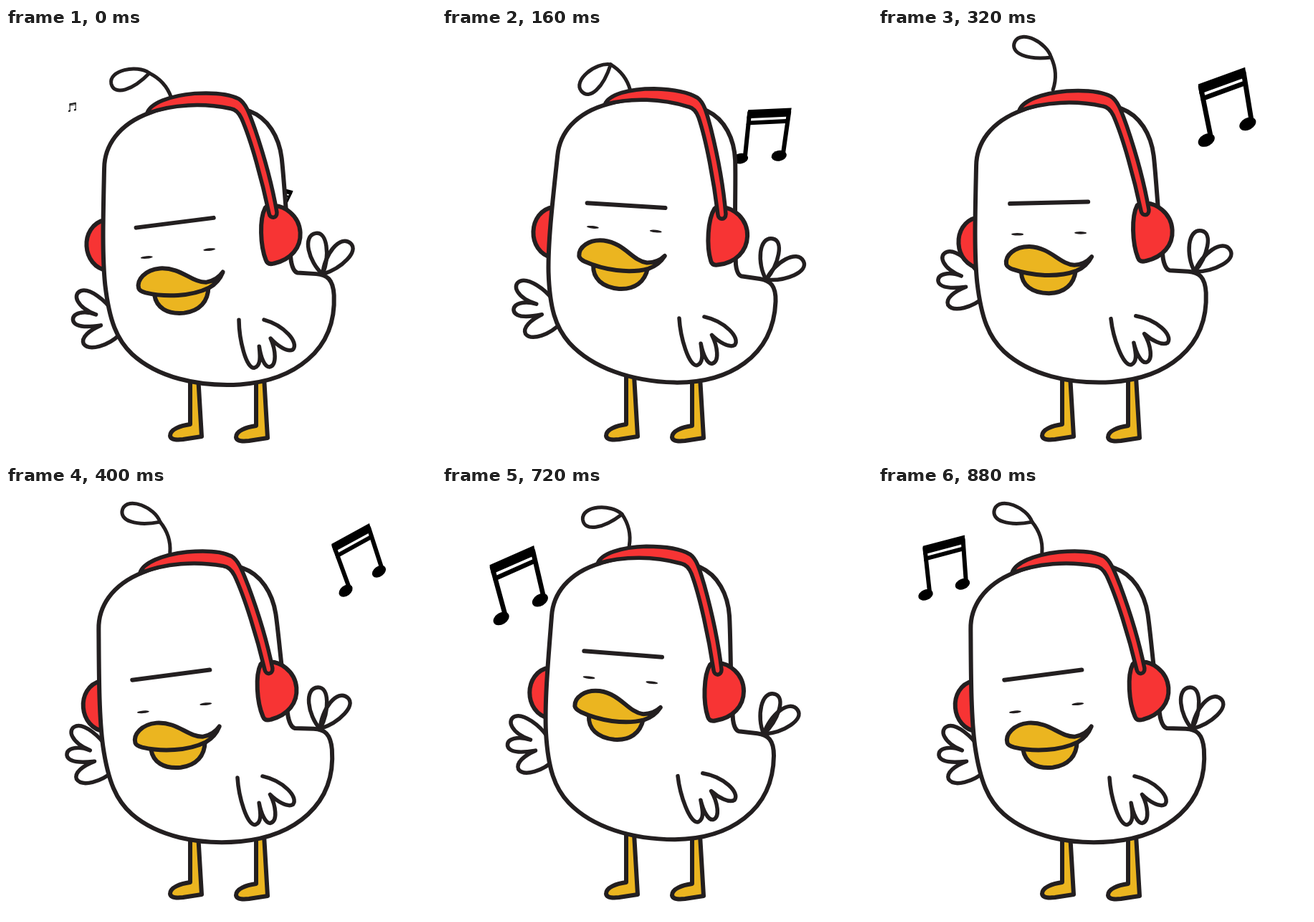
An HTML page with a canvas that plays this animation: 600x600 px, repeating every 0.96 s.

```html
<!DOCTYPE html>
<html lang="en">
<head>
<meta charset="utf-8">
<title>Duck with headphones</title>
<style>
  html, body { margin: 0; width: 100%; height: 100%; overflow: hidden; background: #fff; }
  canvas { display: block; }
</style>
</head>
<body>
<canvas id="stage" width="600" height="600"></canvas>
<script>
const ctx = document.getElementById('stage').getContext('2d');
const INK = '#231f20', RED = '#f73434', YELLOW = '#ebb520', WHITE = '#fff';
const STEP_MS = 80, STEPS = 12, BEAT = 6;

const shapes = {
  body: 'M222 111C175 125 155 155 153 185C148 248 143 305 145 348C148 398 157 425 177 446C210 480 265 497 325 497' +
        'C400 496 462 458 463 380C463 358 455 351 440 349L414 346Q408 344 406 330C402 270 403 220 401 185' +
        'C399 155 385 128 360 117C320 100 260 98 222 111Z',
  band: 'M217 112C222 98 250 89 285 88C318 88 336 93 346 99C356 106 360 122 366 142C378 185 386 225 390 260' +
        'C390 269 380 269 379 261C372 215 360 158 348 126Q343 114 334 112C312 106 295 104 275 104C250 104 230 108 217 112Z',
  cup: 'M374 253C365 268 364 305 371 326Q373 333 382 331C406 327 421 311 421 290C421 266 400 250 384 251Q377 250 374 253Z',
  farCup: 'M150 257C113 263 113 321 150 328Z',
  leg: 'M257 485L257 553C243 555 229 560 229 569Q230 576 247 574L273 570L268 485Z',
  wing: 'M150 397C140 382 118 365 106 369C93 374 100 392 127 402C110 396 94 400 95 410C97 420 115 420 134 417' +
        'C118 424 106 434 110 443C118 454 145 445 160 430',
  hand: 'M329 406C329 432 338 474 350 473C360 470 358 455 357 443C359 458 364 472 371 472C382 470 380 448 373 432' +
        'C382 442 396 452 404 448C413 438 392 414 364 406',
  lip: 'M211 358C212 376 226 387 250 387C272 386 285 374 287 354Z',
  beak: 'M190 347C188 335 201 322 222 322C252 323 264 346 285 347C297 346 304 341 309 335C304 345 297 351 288 355' +
        'C262 365 226 363 199 354Q191 351 190 347Z',
  brow: 'M194 269L303 265',
  stem: 'M0 0Q22 9 45 0',
  loop: 'M0 0C12 18 52 24 55 5C57 -13 30 -14 0 0',
  plume: 'M0 0C20 -17 58 -21 58 -1C58 15 25 14 0 0',
  beams: 'M-35 -34L34 -49L34 -35L-35 -20ZM-34 -16L34 -31L34 -24L-34 -9Z',
  noteStems: 'M-32 -30L-27 46M31 -42L33 30',
};
for (const name in shapes) shapes[name] = new Path2D(shapes[name]);

const mix = (from, to, t) => from + (to - from) * t;

function ink(shape, fill, width = 6) {
  if (fill) { ctx.fillStyle = fill; ctx.fill(shape); }
  ctx.strokeStyle = INK;
  ctx.lineWidth = width;
  ctx.stroke(shape);
}

// Shifts by (x, y) and turns about the pivot while paint runs.
function place({ x = 0, y = 0, deg = 0, scale = 1, pivot: [px, py] = [0, 0] }, paint) {
  ctx.save();
  ctx.translate(x + px, y + py);
  ctx.rotate(deg * Math.PI / 180);
  ctx.scale(scale, scale);
  ctx.translate(-px, -py);
  paint();
  ctx.restore();
}

function oval(x, y, rx, ry, tilt = 0) {
  ctx.beginPath();
  ctx.ellipse(x, y, rx, ry, tilt, 0, 7);
  ctx.fill();
}

// A note flies out from behind the head, slows down, then shrinks away.
function drawNote(age, from, to) {
  if (age > BEAT) return;
  const u = age / BEAT, glide = 1 - (1 - u) ** 2.6;
  const pose = {
    x: mix(from.x, to.x, glide),
    y: mix(from.y, to.y, glide),
    deg: mix(from.deg, to.deg, u),
    scale: 1.03 - .58 * (1 - u) ** 3 - .9 * u ** 9,
  };
  place(pose, () => {
    ctx.fillStyle = ctx.strokeStyle = '#000';
    ctx.lineWidth = 7;
    ctx.fill(shapes.beams);
    ctx.stroke(shapes.noteStems);
    oval(-34, 46, 12.5, 8.5, -.35);
    oval(27, 31, 12.5, 8.5, -.35);
  });
}

function drawTuft(swing, curl) {
  place({ x: 247 + 19 * swing, y: 93 - 8 * swing, deg: 218 + 52 * swing }, () => {
    ink(shapes.stem, null, 5);
    place({ x: 45, deg: curl }, () => ink(shapes.loop, null, 5));
  });
}

function drawFace(nod, browShift) {
  place({ y: 6 - 35 * nod, deg: 8.5 * nod - 1.9, pivot: [249, 303] }, () => {
    place({ y: browShift }, () => ink(shapes.brow));
    ctx.fillStyle = INK;
    oval(205, 305, 8.5, 1.8);
    oval(293, 302, 8.5, 1.8);
    ink(shapes.lip, YELLOW);
    ink(shapes.beak, YELLOW);
  });
}

function draw(step) {
  const wave = (peak, period = BEAT) => Math.cos(2 * Math.PI * (step - peak) / period);
  const sway = wave(2), bob = wave(3.5);
  const lean = 3.27 * sway - 1.63;
  const swing = (1 + wave(4)) / 2;
  const nod = ((1 - wave(0)) / 2) ** 1.27;
  const plume = 6 * sway + 11 * bob - 86;
  const sidePlume = plume + 46 + 9 * wave(1.7, STEPS);
  const withBody = paint => place({ y: -2 - 2 * bob, deg: lean, pivot: [338, 470] }, paint);

  ctx.fillStyle = WHITE;
  ctx.fillRect(0, 0, 600, 600);
  ctx.lineCap = ctx.lineJoin = 'round';

  drawNote(step, { x: 377, y: 240, deg: 27 }, { x: 492, y: 99, deg: -25 });
  drawNote((step + BEAT) % STEPS, { x: 170, y: 264, deg: -25 }, { x: 93, y: 110, deg: 2 });

  ink(shapes.leg, YELLOW);
  place({ x: 92, y: 2 }, () => ink(shapes.leg, YELLOW));

  const wing = { x: 7.5 * sway - 5.5 * bob - 2.5, y: 8 * sway - 31 * bob - 25, deg: bob - 2.5 * sway, pivot: [130, 408] };
  place(wing, () => ink(shapes.wing, null, 5.5));

  withBody(() => {
    drawTuft(swing, -79 - 21 * sway);
    for (const angle of [plume, sidePlume]) {
      place({ x: 449, y: 350, deg: angle - lean }, () => ink(shapes.plume, null, 5.5));
    }
    ink(shapes.farCup, RED);
    ink(shapes.body, WHITE);
    drawFace(nod, 2 * lean);
  });

  const hand = { x: 4 * sway - 2, y: -sway - bob, deg: -3.4 * (1 + bob), pivot: [329, 406] };
  place(hand, () => ink(shapes.hand, null, 5.5));

  withBody(() => {
    ink(shapes.cup, RED);
    ink(shapes.band, RED, 5.5);
  });
}

function tick() {
  draw(Math.floor(performance.now() / STEP_MS) % STEPS);
  requestAnimationFrame(tick);
}
tick();
</script>
</body>
</html>
```
